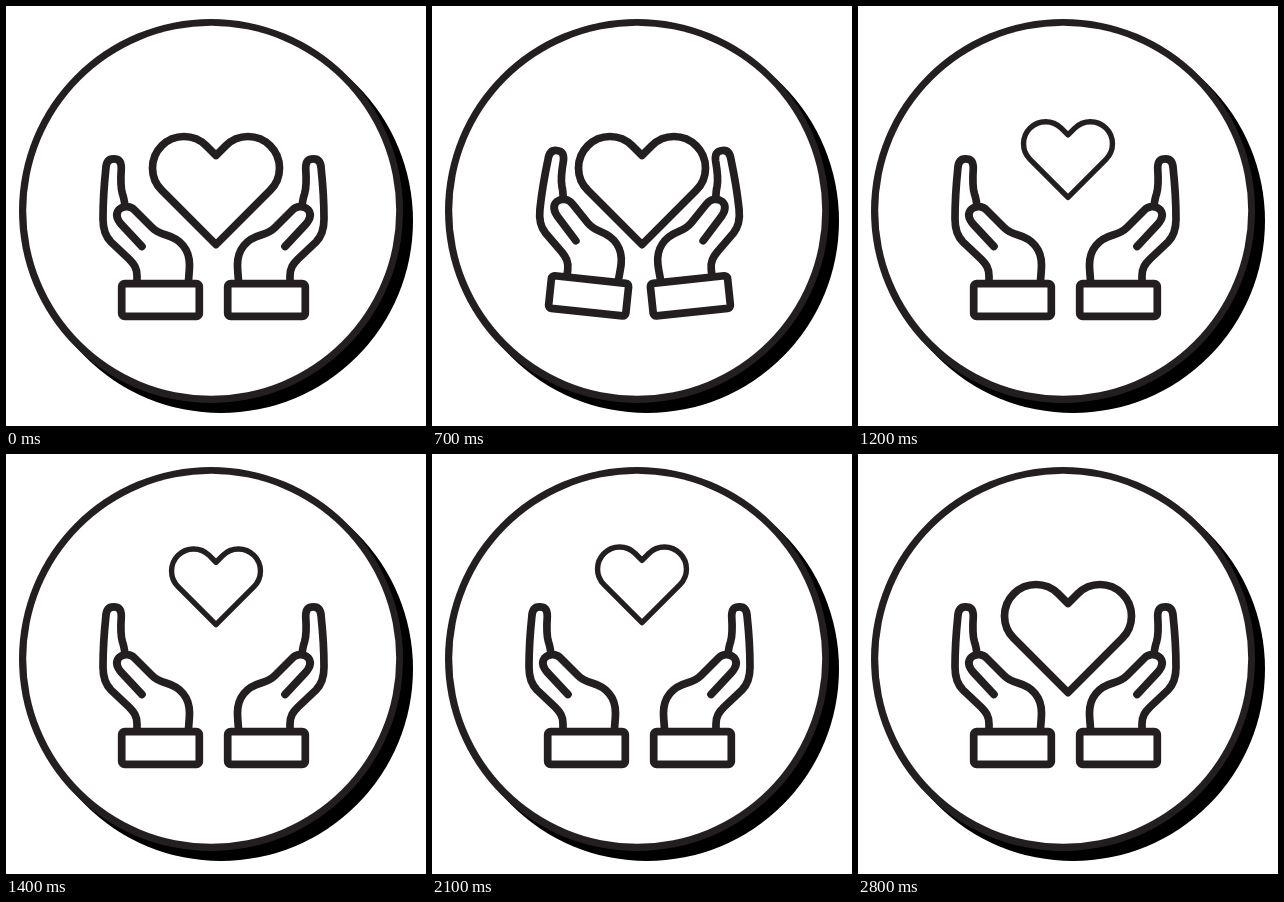
Animation, 420 px wide and 420 px high, one loop 3 s. Source, as an HTML page with a canvas:

```html
<!DOCTYPE html>
<html lang="en">
<head>
<meta charset="utf-8">
<title>Caring hands</title>
<style>
  html, body { margin: 0; width: 100%; height: 100%; overflow: hidden; background: #fff; }
  canvas { display: block; width: 420px; height: 420px; }
</style>
</head>
<body>
<canvas id="stage" width="420" height="420"></canvas>
<script>
const ctx = document.getElementById('stage').getContext('2d');
const LOOP = 3000, STEP = 100;
const INK = '#231f20';
const MIRROR_AXIS = 207.5;
const PIVOT = { x: 195, y: 312 };
const HEART = { x: 210, y: 185, small: 0.7 };

// Keys are [time, value] pairs, eased with a sine between neighbours.
const TILT = [[430, 0], [850, 8.4], [1200, 0]];
const LIFT = [[750, 0], [1200, 1], [2450, 1], [2800, 0]];
const BOB = [[1120, 157], [1480, 130], [1812, 157], [2145, 130], [2570, 157]];

const hand = new Path2D(
  'M131 277V270C131 262 128 258 123 253L105 236C99 230 97 222 97 213' +
  'C97 193 98 180 99.8 163C100 157 102 152.8 107.5 152.8C113 152.8 115.3 156 115.3 162' +
  'C114.3 177 114.5 182 116.5 188C118 192 118.5 196 119 200' +
  'M136 240.5L115 218C110 212 110 207 113 203.5C118 199 125 200 129 204.5' +
  'L146 221.5C150 225.5 155 227.5 160 229C174 233 183.5 243 183.5 259' +
  'C183.5 266 182.5 271 182.5 277');
hand.roundRect(115.7, 277.6, 77.6, 32.8, 3);

const heart = new Path2D();
heart.moveTo(0, 53.6);
heart.arc(-32, -23, 31.5, Math.PI * 0.75, Math.PI * 1.75);
heart.lineTo(0, -35.6);
heart.arc(32, -23, 31.5, Math.PI * 1.25, Math.PI * 2.25);
heart.closePath();

const mix = (a, b, k) => a + (b - a) * k;
const ease = k => (1 - Math.cos(Math.PI * k)) / 2;

function sample(keys, t) {
  if (t <= keys[0][0]) return keys[0][1];
  for (let i = 1; i < keys.length; i++) {
    const [t0, a] = keys[i - 1], [t1, b] = keys[i];
    if (t < t1) return mix(a, b, ease((t - t0) / (t1 - t0)));
  }
  return keys[keys.length - 1][1];
}

function disc(x, y, r, color) {
  ctx.fillStyle = color;
  ctx.beginPath();
  ctx.arc(x, y, r, 0, Math.PI * 2);
  ctx.fill();
}

function drawHand(degrees, mirrored) {
  ctx.save();
  if (mirrored) {
    ctx.translate(MIRROR_AXIS * 2, 0);
    ctx.scale(-1, 1);
  }
  ctx.translate(PIVOT.x, PIVOT.y);
  ctx.rotate(degrees * Math.PI / 180);
  ctx.translate(-PIVOT.x, -PIVOT.y);
  ctx.stroke(hand);
  ctx.restore();
}

function drawHeart(t) {
  const lift = sample(LIFT, t);
  const size = mix(1, HEART.small, lift);
  ctx.save();
  ctx.translate(HEART.x, mix(HEART.y, sample(BOB, t), lift));
  ctx.scale(size, size);
  ctx.stroke(heart);
  ctx.restore();
}

function draw(t) {
  ctx.fillStyle = '#fff';
  ctx.fillRect(0, 0, 420, 420);
  disc(215, 215, 192, '#000');
  disc(205, 205, 192, INK);
  disc(205.2, 204.8, 185, '#fff');

  ctx.strokeStyle = INK;
  ctx.lineWidth = 7.7;
  ctx.lineCap = ctx.lineJoin = 'round';
  const tilt = sample(TILT, t);
  drawHand(tilt, false);
  drawHand(tilt, true);
  drawHeart(t);
}

const start = performance.now();
function frame() {
  const t = (performance.now() - start) % LOOP;
  draw(Math.floor(t / STEP) * STEP);
  requestAnimationFrame(frame);
}
frame();
</script>
</body>
</html>
```
